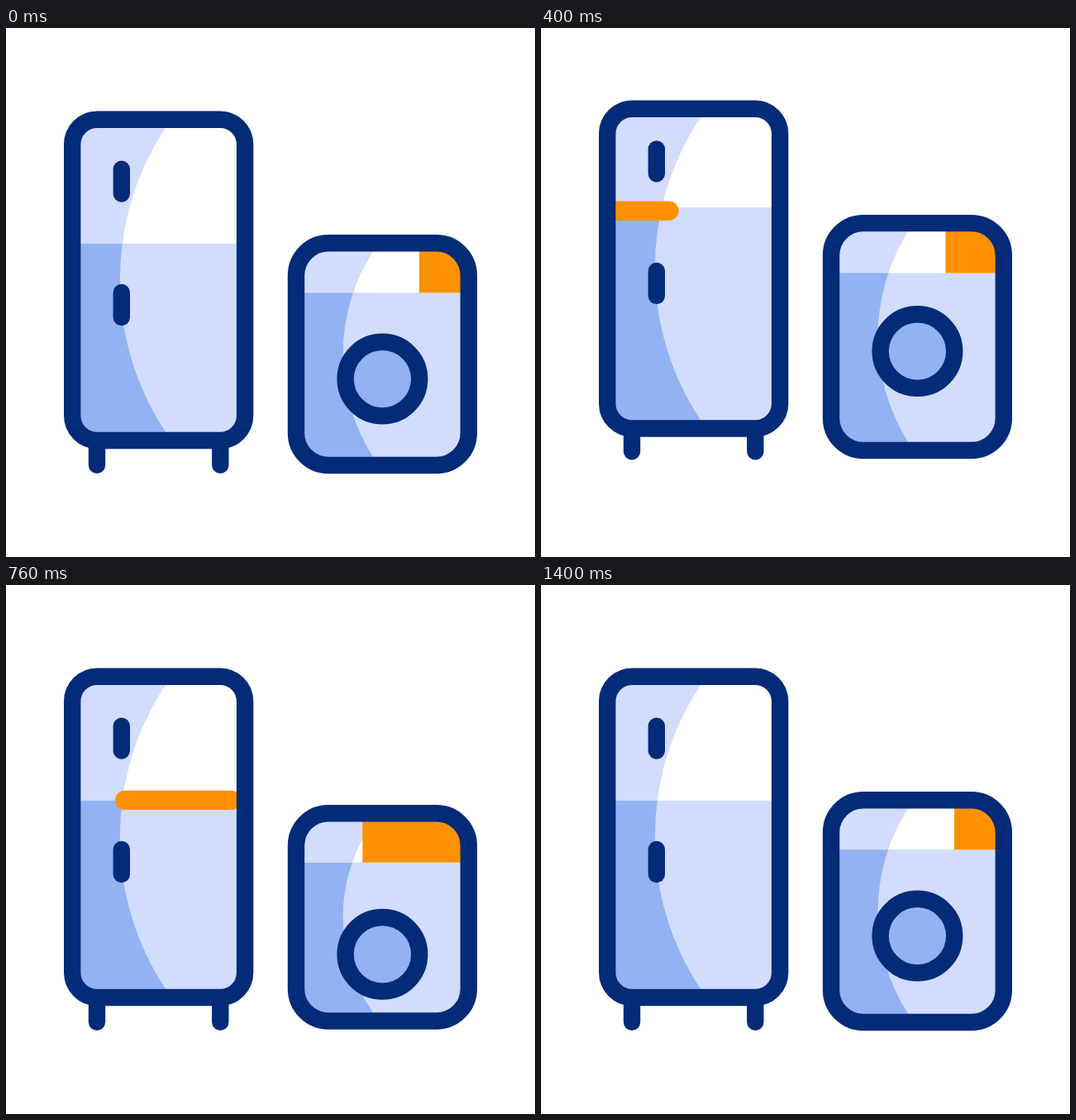
An HTML page with a canvas for the animation above (1.48 s loop, 640x640 px).

```html
<!DOCTYPE html>
<html>
<head>
<meta charset="utf-8">
<title>Appliances</title>
<style>
html, body { margin: 0; width: 100%; height: 100%; overflow: hidden; background: #fff; }
canvas { display: block; }
</style>
</head>
<body>
<canvas id="stage" width="640" height="640"></canvas>
<script>
const ctx = document.getElementById('stage').getContext('2d');
const NAVY = '#032b77', LIGHT = '#d2dcfd', MID = '#92b2f4', ORANGE = '#ff9100';
const LOOP = 1480, STEP = 40, LINE = 20.4;

const clamp = v => Math.min(1, Math.max(0, v));
const progress = (t, a, b) => clamp((t - a) / (b - a));
const smooth = p => p * p * (3 - 2 * p);

// Fast-settling ease: cubic-bezier(.15, 0, .55, 1)
function settle(x) {
  let lo = 0, hi = 1;
  for (let i = 0; i < 20; i++) {
    const s = (lo + hi) / 2, r = 1 - s;
    if (.45 * r * r * s + 1.65 * r * s * s + s ** 3 < x) lo = s; else hi = s;
  }
  return smooth(lo);
}

// Vertical offset of one part: leap up, drop into a squash, return to rest
function hop(t, up, down) {
  if (t < 280) return -up * smooth(progress(t, 82, 280));
  if (t < 640) return -up + (up + down) * settle(progress(t, 280, 620));
  return down * (1 - smooth(progress(t, 640, 750)));
}

function along(points, t) {
  let i = 1;
  while (i < points.length - 1 && t > points[i][0]) i++;
  const [t0, a] = points[i - 1], [t1, b] = points[i];
  return a + (b - a) * progress(t, t0, t1);
}

function line(x1, y1, x2, y2, color = NAVY, width = LINE) {
  ctx.beginPath();
  ctx.moveTo(x1, y1);
  ctx.lineTo(x2, y2);
  ctx.strokeStyle = color;
  ctx.lineWidth = width;
  ctx.lineCap = 'round';
  ctx.stroke();
}

function box(x1, y1, x2, y2, color) {
  ctx.fillStyle = color;
  ctx.fillRect(x1, y1, x2 - x1, y2 - y1);
}

// Rounded body with a two-tone fill, a curved shade on the left and an accent
function body({ x1, x2, top, bottom, radius, split, edge, depth, half }, accent) {
  const shape = new Path2D();
  shape.roundRect(x1, top, x2 - x1, bottom - top, radius);
  const y1 = top + LINE / 2, y2 = bottom - LINE / 2;
  const rx = (half * half + depth * depth) / (2 * depth);
  const ry = rx * (y2 - y1) / (2 * half);
  const angle = Math.asin(half / rx);

  ctx.save();
  ctx.clip(shape);
  box(x1, top, x2, split, '#fff');
  box(x1, split, x2, bottom, LIGHT);
  ctx.save();
  ctx.beginPath();
  ctx.moveTo(x1, y2);
  ctx.lineTo(x1, y1);
  ctx.ellipse(edge - depth + rx, (y1 + y2) / 2, rx, ry, 0, Math.PI + angle, Math.PI - angle, true);
  ctx.clip();
  box(x1, top, x2, split, LIGHT);
  box(x1, split, x2, bottom, MID);
  ctx.restore();
  accent();
  ctx.restore();

  ctx.strokeStyle = NAVY;
  ctx.lineWidth = LINE;
  ctx.stroke(shape);
}

const barPath = [[80, -80], [200, -44], [400, 14.5], [640, 101.5], [760, 132], [1080, 225], [1280, 284]];

function fridge(t) {
  const bottom = 499 + hop(t, 30, 4.3);
  const foot = 528.8 + hop(t, 30, 0);
  for (const x of [110, 259.3]) line(x, bottom, x, foot);

  body({
    x1: 80.2, x2: 289.1, top: 110.7 + hop(t, 40, 20), bottom, radius: 30,
    split: 260.8 + hop(t - 10, 77, 5), edge: 193, depth: 55.2, half: 184
  }, () => {
    const x = along(barPath, t), y = 260.4 + hop(t - 5, 73, 6);
    line(x + 11.7, y, x + 140.3, y, ORANGE, 23.4);
  });

  const upper = 170.6 + hop(t, 60, 19.5), lower = 320 + hop(t, 60, 15.5);
  for (const y of [upper, lower]) line(139.8, y, 139.8, y + 30);
}

function panelEdge(t) {
  const swing = t < 820
    ? progress(t, 280, 820) ** 1.35
    : (1 - progress(t, 820, 1400)) ** 1.35;
  return 500 - 80.5 * swing;
}

function washer(t) {
  const local = t - 203;
  const top = 260.3 + hop(local, 39, 19), split = 320.3 + hop(local, 38.5, 18.5);
  body({
    x1: 351, x2: 559.8, top, bottom: 529 + hop(local, 29, 0), radius: 39,
    split, edge: 444, depth: 36.4, half: 124.3
  }, () => box(panelEdge(t), top, 560, split, ORANGE));

  ctx.beginPath();
  ctx.arc(455.4, 424.6 + hop(local, 54, 26.5), 44.8, 0, 2 * Math.PI);
  ctx.fillStyle = MID;
  ctx.fill();
  ctx.stroke();
}

function draw() {
  const t = Math.floor(performance.now() % LOOP / STEP) * STEP;
  box(0, 0, 640, 640, '#fff');
  fridge(t);
  washer(t);
  requestAnimationFrame(draw);
}
draw();
</script>
</body>
</html>
```
